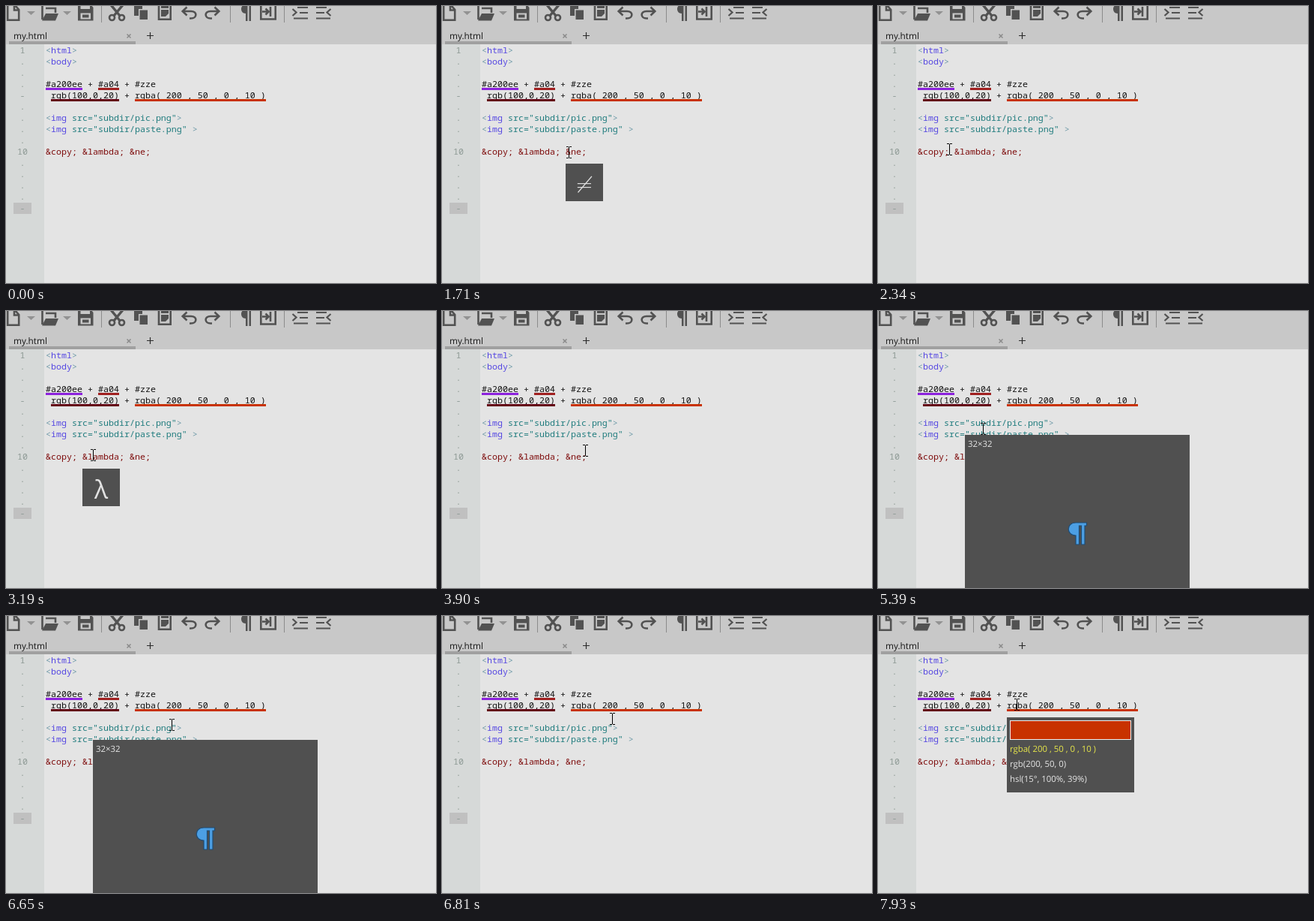
Animation, 574 px wide and 369 px high, one loop 8000 ms. Source, as an HTML page:

```html
<!DOCTYPE html>
<html lang="en">
<head>
<meta charset="utf-8">
<title>Editor hover previews</title>
<style>
  html, body { margin: 0; width: 100%; height: 100%; overflow: hidden; background: #e4e4e4; }
  svg { display: block; width: 574px; height: 369px; }
  text { white-space: pre; }
  .code { font: 11.67px "Noto Sans Mono", monospace; fill: #141414; }
  .tag { fill: #5648e2; }
  .bracket { fill: #6f9aa8; }
  .string { fill: #207c7e; }
  .entity { fill: #7e0c0c; }
  .gutter { font: 11.67px "Noto Sans Mono", monospace; fill: #8d9994; text-anchor: middle; }
  .ui { font: 11.4px "Open Sans", "Noto Sans", sans-serif; text-rendering: geometricPrecision; }
  .glyph { font: 34px "Open Sans", "DejaVu Sans", sans-serif; fill: #e2e2e2; text-anchor: middle; }
  .sign { font: 200 29px "DejaVu Sans", sans-serif; }
  .line { fill: none; stroke: #525252; stroke-width: 2.6; }
  .solid { fill: #525252; }
  .popup { visibility: hidden; fill: #e6e6e6; }
  .panel { fill: #505050; }
</style>
</head>
<body>
<svg viewBox="0 0 574 369">
  <rect width="574" height="369" fill="#e4e4e4"/>
  <rect y="51" width="51" height="318" fill="#d6d9d8"/>
  <rect width="574" height="51" fill="#c8c8c8"/>

  <!-- toolbar -->
  <path d="M28 7h11l-5.500 5zM76 7h11l-5.500 5z" fill="#929292"/>
  <path d="M127.500 0V22M299.500 0V22M371.500 0V22" stroke="#8c8c8c"/>
  <g class="line">
    <path d="M2.200 -3V18.700H17.200V5L12 -1M11 -1V5.500H17"/>
    <path d="M48.500 18V-3M53 3H66V9"/>
    <circle cx="141.500" cy="15.500" r="3.500"/><circle cx="154.500" cy="15.500" r="3.500"/>
    <path d="M144 13L156.500 -2M152 13L139.500 -2" stroke-width="3.400"/>
    <path d="M204 -3V17.700H219.700V-3"/>
    <g id="undo">
      <path d="M241.500 1.500L235.700 7L241.500 12.500M236 7H247C256 7 255 16.500 247 16.500H245"/>
    </g>
    <use href="#undo" transform="translate(520) scale(-1 1)"/>
    <path d="M340.300 -3V17.500H359.700V-3M353 1V14M342 7.500H350M346.500 3.500L350.500 7.500L346.500 11.500"/>
    <path d="M389 2H403M392 9H403M384 16.500H403M382.500 4L387.500 8.500L382.500 13" stroke-width="2.200"/>
    <path d="M414 2H428M414 9H425M414 16.500H433M433.500 4L428.500 8.500L433.500 13" stroke-width="2.200"/>
  </g>
  <g class="solid">
    <path d="M53 10H70L66 19.500H48Z"/>
    <path fill-rule="evenodd" d="M96 -2H113L116.500 2V19.500H96ZM99.500 0V4H112V0ZM99.500 9.500V17.500H113V9.500Z"/>
    <path d="M102 11.500H110.500V15.500H102Z"/>
    <path d="M171 -2H182V4H177V13H171ZM178.500 5.500H189V18H178.500Z"/>
    <path d="M207 -2H217V3H207ZM207 5H217V10L213 14H207Z"/>
    <path d="M327 -2H320C312 -2 312 10 320 10V20H322.500V0H324.500V20H327Z"/>
  </g>

  <!-- tab -->
  <rect x="4" y="47" width="169" height="4" fill="#a0a0a0"/>
  <text class="ui" x="10" y="44" fill="#181818" style="font-size:11.8px">my.html</text>
  <path d="M161.500 37.500l5 5m0-5l-5 5" stroke="#8a8a8a" stroke-width="1.500"/>
  <path d="M188 39.500h9m-4.500-4.500v9" stroke="#2c2c2c" stroke-width="1.200"/>

  <rect x="10" y="262" width="24" height="15" fill="#c0c0c0"/>
  <g id="gutter" class="gutter"></g>

  <g class="code">
    <text x="53" y="63"><tspan class="bracket">&lt;</tspan><tspan class="tag">html</tspan><tspan class="bracket">&gt;</tspan></text>
    <text x="53" y="78"><tspan class="bracket">&lt;</tspan><tspan class="tag">body</tspan><tspan class="bracket">&gt;</tspan></text>
    <text x="53" y="108">#a200ee + #a04 + #zze</text>
    <text x="60" y="123">rgb(100,0,20) + rgba( 200 , 50 , 0 , 10 )</text>
    <text x="53" y="153"><tspan class="bracket">&lt;</tspan><tspan class="tag">img</tspan><tspan class="string"> src="subdir/pic.png"</tspan><tspan class="bracket">&gt;</tspan></text>
    <text x="53" y="168"><tspan class="bracket">&lt;</tspan><tspan class="tag">img</tspan><tspan class="string"> src="subdir/paste.png"</tspan><tspan class="bracket"> &gt;</tspan></text>
    <text x="53" y="198" class="entity">&amp;copy; &amp;lambda; &amp;ne;</text>
  </g>
  <path d="M53 109h49v3h-49z" fill="#8c22dc"/>
  <path d="M123 109h28v3h-28z" fill="#a02020"/>
  <path d="M60 124h91v3h-91z" fill="#640014"/>
  <path d="M172 124h175v3h-175z" fill="#c83200"/>

  <!-- previews, each drawn from its own top left corner -->
  <g class="popup" id="copy"><rect class="panel" width="50" height="50"/><text class="glyph" x="25" y="40">©</text></g>
  <g class="popup" id="lambda"><rect class="panel" width="50" height="50"/><text class="glyph" x="25" y="40">λ</text></g>
  <g class="popup" id="notEqual"><rect class="panel" width="50" height="50"/><text class="glyph sign" x="25" y="38">≠</text></g>
  <g class="popup" id="paste">
    <rect class="panel" width="300" height="300"/>
    <text class="ui" x="4" y="16">32×32</text>
    <rect x="135.500" y="118.500" width="21" height="26" rx="1" fill="#bd8a4c" stroke="#8c5c28"/>
    <path d="M142 121.500v-3h2.500v-2h4v2h2.500v3z" fill="#d4d8dc" stroke="#7c8084" stroke-width=".8"/>
    <path d="M147.500 124.500h12l5 5v16h-17z" fill="#f4f4f2" stroke="#b4b4b0"/>
    <path d="M159.500 124.500v5h5z" fill="#cfcfcb"/>
  </g>
  <g class="popup" id="pilcrow">
    <rect class="panel" width="300" height="300"/>
    <text class="ui" x="4" y="16">32×32</text>
    <path d="M162.500 117H148C135 117 135 134 148 134V146H152.500V121H155.500V146H160V121H162.500Z" fill="#4c9fe4" stroke="#1f4c74" stroke-width="1.200"/>
  </g>
  <g class="popup" id="color">
    <rect class="panel" width="170" height="100"/>
    <rect x="4.500" y="4.500" width="161" height="25" fill="#c83200" stroke="#f0f0f0"/>
    <g class="ui">
      <text x="4" y="46" fill="#e6e64a">rgba( 200 , 50 , 0 , 10 )</text>
      <text x="4" y="66">rgb(200, 50, 0)</text>
      <text x="4" y="86">hsl(15°, 100%, 39%)</text>
    </g>
  </g>

  <path id="cursor" d="M-3-8h3v1h1v-1h3v1h-3v14h3v1h-3v-1h-1v1h-3v-1h3v-14h-3z" fill="#000"/>
</svg>
<script>
const LOOP = 8000, LEFT = 53, COLUMN = 7, ROW = 15;
const byId = id => document.getElementById(id);

// Hover areas: preview, text line, first column, length.
const areas = [
  ['color', 5, 17, 25],
  ['pilcrow', 7, 9, 16],
  ['paste', 8, 9, 18],
  ['copy', 10, 0, 6],
  ['lambda', 10, 7, 8],
  ['notEqual', 10, 16, 4],
].map(([id, line, column, length]) => ({
  node: byId(id),
  x: LEFT + column * COLUMN,
  width: length * COLUMN,
  top: 52 + (line - 1) * ROW,
}));
for (const { node, x, top } of areas) node.setAttribute('transform', `translate(${x} ${top + 23})`);

// Pointer moves: first step time, last step time, steps, destination.
const moves = [
  [380, 380, 1, 413, 349],
  [460, 1080, 9, 173, 197],
  [1230, 1230, 1, 172, 195],
  [1710, 1710, 1, 169, 195],
  [1790, 1940, 3, 140, 194],
  [2180, 2490, 5, 70, 190],
  [3030, 3500, 7, 187, 195],
  [3660, 3660, 1, 186, 194],
  [3820, 4130, 5, 199, 170],
  [4210, 4290, 2, 198, 168],
  [4450, 4840, 6, 153, 165],
  [5000, 5390, 6, 140, 157],
  [5470, 5550, 2, 140, 150],
  [5780, 6330, 8, 204, 149],
  [6490, 6650, 3, 221, 145],
  [6730, 7040, 5, 239, 121],
  [7360, 7930, 8, 185, 118],
];

const ease = k => k * k * (3 - 2 * k);

function pointerAt(time) {
  let point = null;
  for (const [start, end, steps, x, y] of moves) {
    if (time < start) break;
    const step = steps === 1 ? 0 : Math.floor((time - start) / (end - start) * (steps - 1) + 1e-6);
    const k = ease(Math.min(steps, step + 1) / steps);
    const from = point || { x, y };
    point = {
      x: Math.round(from.x + (x - from.x) * k),
      y: Math.round(from.y + (y - from.y) * k),
    };
  }
  return point;
}

for (let line = 1; line <= 15; line++) {
  const label = document.createElementNS('http://www.w3.org/2000/svg', 'text');
  label.setAttribute('x', 22);
  label.setAttribute('y', 48 + line * ROW);
  label.textContent = line === 1 || line === 10 ? line : line % 5 ? '.' : '-';
  byId('gutter').append(label);
}

const cursor = byId('cursor');

function draw() {
  const point = pointerAt(performance.now() % LOOP);
  cursor.style.visibility = point ? 'visible' : 'hidden';
  if (point) cursor.setAttribute('transform', `translate(${point.x} ${point.y})`);
  for (const { node, x, width, top } of areas) {
    const hovered = point && point.x >= x && point.x < x + width
      && point.y > top && point.y <= top + ROW;
    node.style.visibility = hovered ? 'visible' : 'hidden';
  }
  requestAnimationFrame(draw);
}
draw();
</script>
</body>
</html>
```
